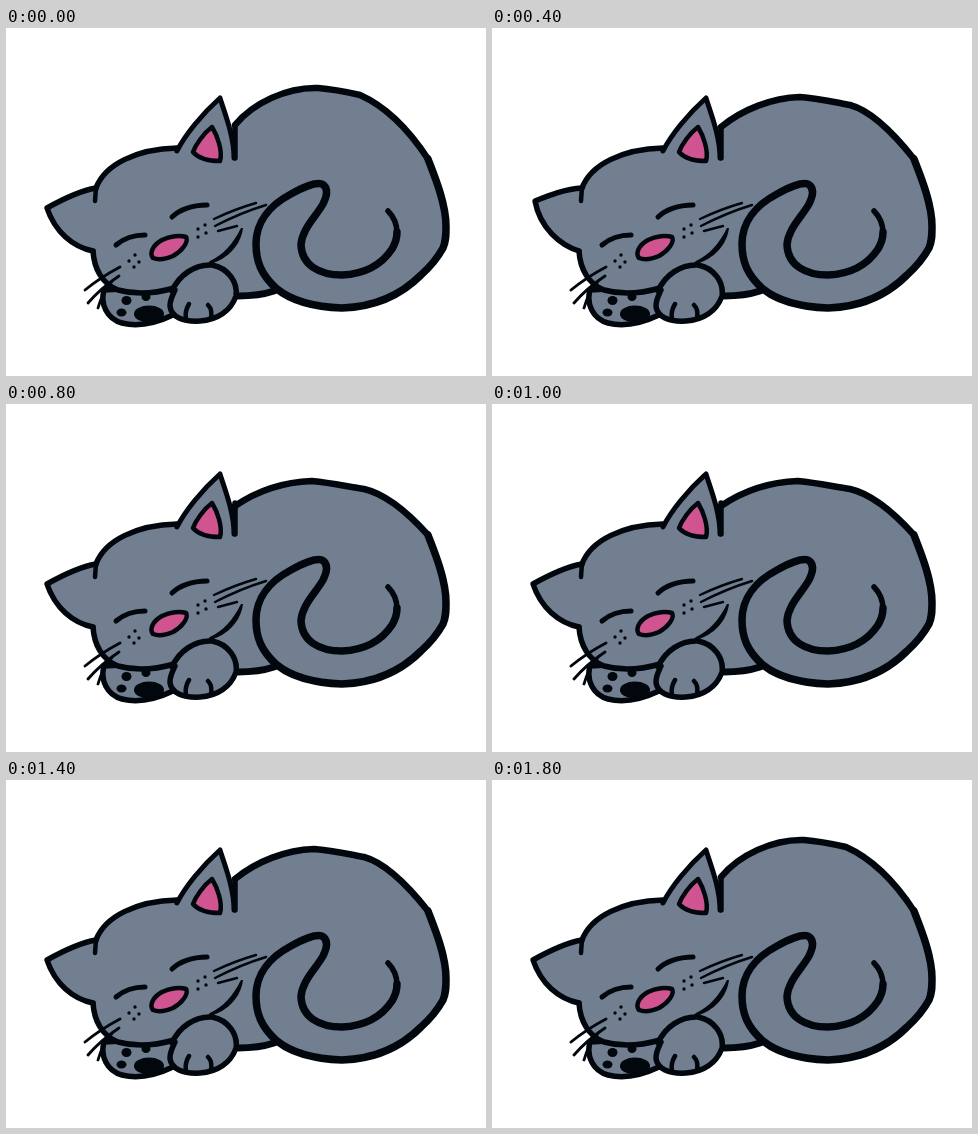
Animation of 480 by 348 pixels, one loop 2 s. Source, as an HTML page:

```html
<!DOCTYPE html>
<html lang="en">
<head>
<meta charset="utf-8">
<title>Sleeping cat</title>
<style>
  html, body { margin: 0; width: 100%; height: 100%; overflow: hidden; background: #fff; }
  svg { display: block; width: 480px; height: 348px; }
  .line { fill: none; }
  .flat { stroke: none; }
  .ink { fill: #02070e; stroke: none; }
  .pink { fill: #d05490; }
</style>
</head>
<body>
<svg viewBox="0 0 480 348" fill="#717f91" stroke="#02070e" stroke-width="5.500" stroke-linecap="round" stroke-linejoin="round">
  <!-- body and tail -->
  <path id="bodyFill" class="flat"/>
  <path id="back" class="line" stroke-width="6.500"/>
  <path class="line" stroke-width="7" d="M232 268C244 268 256 267 268 263"/>
  <path class="line" stroke-width="7.500" d="M422 131C429 149 440 176 440 198C440 207 440 213 437 220C432 229 424 239 415 247C393 269 367 279 336 280C309 279 287 274 271 261C255 247 250 233 250 216C250 194 264 177 285 166C298 159 309 154 316 156C323 160 321 168 317 176C309 190 296 201 295 217C296 237 313 247 336 247C359 246 376 236 386 221C389 216 391 210 391 204"/>
  <path class="line" d="M391 205C391 196 388 189 382 183"/>

  <!-- far paw -->
  <path d="M98 262C94 276 101 291 116 295C131 299 148 296 167 287L170 258Z"/>
  <g class="ink">
    <ellipse cx="143" cy="286" rx="15" ry="8.500"/>
    <ellipse cx="120.500" cy="272.500" rx="5" ry="4.500"/>
    <ellipse cx="140" cy="269" rx="4.500" ry="4"/>
    <ellipse cx="115.500" cy="284.500" rx="5" ry="4"/>
  </g>

  <!-- head -->
  <path id="headFill" class="flat"/>
  <path id="ear" class="line"/>
  <path class="line" d="M90 160C99 136 131 121 171 120"/>
  <path class="line" stroke-width="4.500" d="M90 159L89 173"/>
  <path class="line" d="M87 223C88 240 96 256 112 262C130 267 151 265 168 260"/>
  <path class="line" stroke-width="5" d="M171 123C179 107 196 86 214 70C219 86 228 108 228 130"/>
  <path class="line" d="M229 99L229 130"/>
  <path class="pink" stroke-width="4.500" d="M206 99C198 105 190 116 187 124C193 131 204 133 214 133C217 123 211 107 206 99Z"/>
  <path class="ink" d="M237 200C235 217 222 231 204 236C202 236 202 234 204 233C217 227 227 216 235 200Z"/>

  <!-- near paw -->
  <path d="M166 263C173 247 189 236 206 237C222 240 232 254 230 268C225 283 211 292 194 293C177 294 165 289 164 278C164 271 167 267 169 262"/>
  <path class="line" stroke-width="4.500" d="M183 276C180 281 179 286 180 291M202 277C206 281 206 285 205 290"/>

  <!-- face -->
  <path class="line" stroke-width="5" d="M110 217C117 211 128 207 139 207M166 189C173 182 186 177 201 177"/>
  <path class="pink" stroke-width="4.500" d="M147 230C143 225 147 217 156 212C164 208 174 207 180 209C183 214 176 223 167 228C160 231 152 232 147 230Z"/>
  <g id="dots" class="ink"></g>
  <path class="line" stroke-width="2.400" d="M208 191Q229 181 250 175M209 198Q234 185 260 177M212 203L231 198"/>
  <path class="line" stroke-width="2.800" d="M114 239Q95 249 79 262M113 248Q95 260 82 275M107 252Q96 265 92 280"/>
</svg>
<script>
  const backs = [
    "229 97C247 75 281 59 312 60C326 61 341 64 354 67C383 80 405 105 422 131",
    "229 98C252 79 286 65 316 66C330 68 345 72 358 76C381 86 403 107 422 131",
    "229 99C251 81 280 70 308 69C325 70 342 74 358 77C380 83 403 107 422 131",
    "229 100C251 84 278 74 306 74C325 75 341 79 357 82C380 88 403 109 422 131",
    "229 102C251 87 278 78 306 77C327 79 343 83 358 85C380 90 404 111 422 131"
  ];
  const ears = {
    rest: "90 160C73 163 57 171 41 180C49 204 67 219 87 223",
    twitch: "90 160C73 161 58 167 43 173C48 200 68 217 87 223"
  };
  const breath = [0, 1, 2, 3, 4, 4, 3, 2, 1, 0];
  const stepMs = 200, twitchStep = 2;

  const $ = id => document.getElementById(id);
  const setPath = (id, d) => $(id).setAttribute("d", d);

  const dots = [[129, 227], [123, 233], [133, 234], [128, 239], [192, 201], [199, 197], [192, 209], [200, 205]];
  for (const [x, y] of dots) {
    const dot = document.createElementNS("http://www.w3.org/2000/svg", "circle");
    dot.setAttribute("cx", x);
    dot.setAttribute("cy", y);
    dot.setAttribute("r", 1.7);
    $("dots").append(dot);
  }

  function pose(step) {
    const back = backs[breath[step]];
    const ear = step === twitchStep ? ears.twitch : ears.rest;
    setPath("back", "M" + back);
    setPath("bodyFill", `M${back}C429 149 440 176 440 198C440 207 440 213 437 220
      C432 229 424 239 415 247C393 269 367 279 336 280C309 279 287 274 271 261L232 268L195 262L195 130Z`);
    setPath("ear", "M" + ear);
    setPath("headFill", `M${ear}C88 240 96 256 112 262C130 267 151 265 168 260L204 250L236 205
      L228 130C228 108 219 86 214 70C196 86 179 107 171 120C131 121 99 136 90 160Z`);
  }

  let shown = -1;
  function tick() {
    const step = Math.floor(performance.now() / stepMs) % breath.length;
    if (step !== shown) pose(shown = step);
    requestAnimationFrame(tick);
  }
  tick();
</script>
</body>
</html>
```
